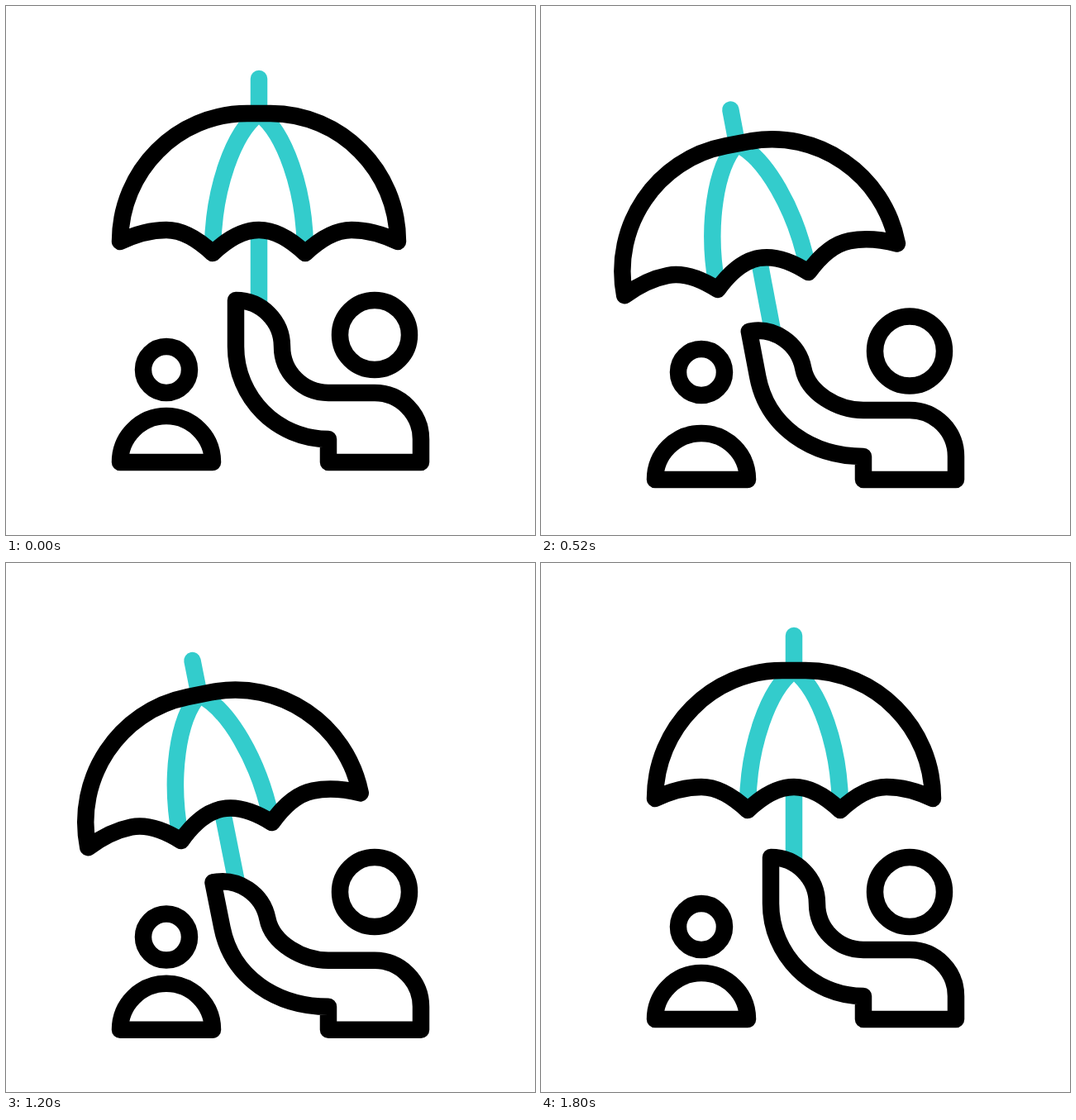
Animation, 640 px wide and 640 px high, one loop 2040 ms. Source, as an HTML page:

```html
<!DOCTYPE html>
<html lang="en">
<head>
<meta charset="utf-8">
<title>Umbrella shelter</title>
<style>
  html, body { margin: 0; width: 100%; height: 100%; overflow: hidden; background: #fff; }
  svg { display: block; width: 100%; height: 100%; }
  path, circle, line { fill: none; stroke: #000; stroke-width: 20.5; stroke-linejoin: round; stroke-linecap: round; }
  .teal { stroke: #33cccc; }
  .butt { stroke-linecap: butt; }
</style>
</head>
<body>
<svg viewBox="0 0 640 640">
  <line id="rainLeft" class="teal"/>
  <line id="rainRight" class="teal"/>
  <g id="scene">
    <g id="umbrella">
      <path class="teal" d="M306 88V130"/>
      <path class="teal butt" d="M306 272V363"/>
      <path class="teal butt" d="M250 293C251 221 275 153 306 130C337 153 361 221 362 293"/>
      <path d="M138 285C138 199.5 207 130 292 130H320C405 130 474 199.5 474 285
        C457 277 437 271 418 271C399 271 380 282 362 299C344 282 325 271 306 271
        C287 271 268 282 250 299C232 282 213 271 194 271C175 271 155 277 138 285Z"/>
    </g>
    <path id="adult"/>
    <path d="M138 552A56 56 0 0 1 250 552Z"/>
    <circle id="adultHead" cx="446" cy="398" r="42"/>
    <circle id="childHead" cx="194" cy="440" r="28"/>
  </g>
</svg>
<script>
const LOOP = 2040, STEP = 40;
const TILT = { sin: 0.196, shrink: 0.0194, x: 306, y: 285, dx: -42, dy: 13.5 };
const $ = id => document.getElementById(id);

// Smooth 0 to 1 between two times
function ease(t, from, to) {
  const u = Math.min(1, Math.max(0, (t - from) / (to - from)));
  return u * u * (3 - 2 * u);
}

// Goes up over [a, b], comes back over [c, d]
const swing = (t, a, b, c, d) => ease(t, a, b) - ease(t, c, d);

function tiltMatrix(s) {
  const { sin, shrink, x, y, dx, dy } = TILT;
  const a = 1 - shrink * s, b = -sin * s;
  return [a, b, -b, a,
    s * (dx + shrink * x - sin * y),
    s * (dy + sin * x + shrink * y)];
}

// The hand follows the umbrella; the shoulder stays put
function adultPath([a, b, c, d, e, f]) {
  const p = (x, y) => `${(a * x + c * y + e).toFixed(2)} ${(b * x + d * y + f).toFixed(2)} `;
  return `M${p(278, 356)}C${p(308.9, 356)}${p(334, 381.1)}${p(334, 412)}` +
    `C${p(334, 442.9)}359.1 468 390 468H446A56 56 0 0 1 502 524V552H390V524` +
    `C328.1 524 ${p(278, 473.9)}${p(278, 412)}Z`;
}

function drawRain(line, x0, y0, x1, y1, tail, head) {
  const at = (p, q, k) => p + (q - p) * k;
  line.setAttribute("x1", at(x0, x1, tail));
  line.setAttribute("y1", at(y0, y1, tail));
  line.setAttribute("x2", at(x0, x1, head));
  line.setAttribute("y2", at(y0, y1, head));
  line.style.display = head > 0 && tail < 1 ? "" : "none";
}

const shift = (el, y) => el.setAttribute("transform", `translate(0 ${y})`);

function draw(t) {
  const tilt = tiltMatrix(swing(t, 111, 583, 1190, 1770));
  $("umbrella").setAttribute("transform", `matrix(${tilt})`);
  $("adult").setAttribute("d", adultPath(tilt));

  shift($("scene"), 28 * swing(t, 103, 723, 851, 1511));
  shift($("childHead"), -20 * swing(t, 156, 609, 680, 1232));
  shift($("adultHead"), -20.6 * swing(t, 445, 898, 963, 1526));

  const head = ease(t, 625, 1118), tail = ease(t, 802, 1185);
  drawRain($("rainLeft"), 61.6, 301.5, 62.8, 568, tail, head);
  drawRain($("rainRight"), 447, 230, 550, 490, tail, head);
}

const start = performance.now();
function tick() {
  const t = (performance.now() - start) % LOOP;
  draw(Math.floor(t / STEP) * STEP);
  requestAnimationFrame(tick);
}
tick();
</script>
</body>
</html>
```
